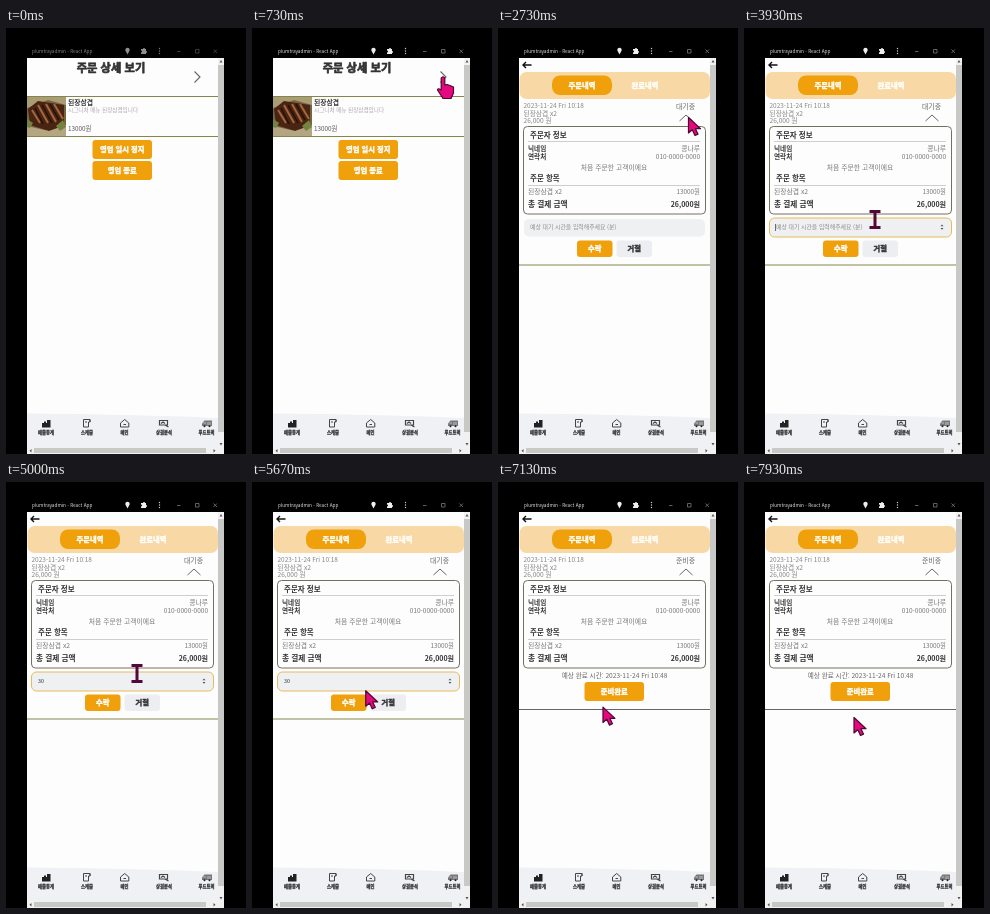
These frames come from a looping animation (240 px wide and 426 px high, 8 s). An HTML page:

```html
<!DOCTYPE html>
<html lang="ko">
<head>
<meta charset="utf-8">
<style>
html, body { margin: 0; width: 100%; height: 100%; overflow: hidden; background: #000; }
svg { display: block; width: 240px; height: 426px; font-family: "Noto Sans CJK KR", "Noto Sans CJK", "Noto Sans CJK JP", sans-serif; }
</style>
</head>
<body>
<svg id="stage" viewBox="0 0 240 426"></svg>
<script>
const LOOP = 8000;
const ORANGE = '#f0a00a', OLIVE = '#85854a', INK = '#333', GREY = '#777';

// Drawing helpers returning SVG markup
const text = (x, y, size, str, fill = GREY, weight = 400, anchor = 'start', outline = 0) =>
  `<text x="${x}" y="${y}" font-size="${size}" fill="${fill}" stroke="${fill}" stroke-width="${outline}" stroke-linejoin="round" font-weight="${weight}" text-anchor="${anchor}">${str}</text>`;
const bold = (x, y, size, str, anchor, fill = INK) => text(x, y, size, str, fill, 700, anchor);
const heavy = (x, y, size, str, fill = INK) => text(x, y, size, str, fill, 900, 'middle', size * .06);
const rect = (x, y, w, h, fill, r = 0, stroke = 'none') =>
  `<rect x="${x}" y="${y}" width="${w}" height="${h}" rx="${r}" fill="${fill}" stroke="${stroke}"/>`;
const line = (d, stroke, width = 1) =>
  `<path d="${d}" fill="none" stroke="${stroke}" stroke-width="${width}"/>`;
const shape = (d, fill) => `<path d="${d}" fill="${fill}"/>`;
const rule = (y, color = OLIVE) => line(`M21 ${y}H212`, color);
const button = (x, y, w, h, label, fill = ORANGE, ink = '#fff') =>
  rect(x, y, w, h, fill, 3) + heavy(x + w / 2, y + h / 2 + 2.3, 7.3, label, ink);
const group = (id, body) => `<g id="${id}">${body}</g>`;

const titleBar = group('title',
  text(26, 25, 4.7, 'plumtrayadmin - React App', '#ddd') +
  shape('M121.500 26.500L119.500 22.800A2.200 2.200 0 1 1 123.500 22.800Z', '#eee') +
  shape('M135 21H137A1 1 0 0 1 139 21H140V23A1 1 0 0 1 140 25V26H135V24.500A1 1 0 0 0 135 22.500Z', '#eee') +
  [20.5, 23, 25.5].map(y => `<circle cx="153.500" cy="${y}" r=".7" fill="#ccc"/>`).join('') +
  line('M171 23.500H174.500M189.500 21.500H193V25H189.500ZM207.500 21.500L211 25M211 21.500L207.500 25', '#888', .7));

const scrollbars =
  rect(212, 30, 6, 396, '#f1f1f1') + rect(212, 37, 6, 367, '#c8c8c6') +
  rect(21, 420, 191, 6, '#f1f1f1') + rect(28, 420, 172, 5, '#c8c8c6') +
  shape('M213.500 34.500L215 32L216.500 34.500Z M213.500 415L215 417.500L216.500 415Z', '#555') +
  shape('M25.500 421L23.500 422.700L25.500 424.500Z M207.500 421L209.500 422.700L207.500 424.500Z', '#555');

const navItems = [[40, '매출통계'], [81, '스케줄'], [118.5, '메인'], [158, '상권분석'], [200.5, '푸드트럭']];
const nav =
  shape('M21 385.500Q120 386 212 390V420H21Z', '#eff1f5') +
  navItems.map(([x, label]) => heavy(x, 406, 4.3, label)).join('') +
  shape('M36 399.500V395H38V393.500H40V395H41V392H44.500V399.500Z', '#222') +
  line('M77.500 391.500H84V394H82.500V399H77.500ZM84 394V391.500M79 394H81', '#444') +
  line('M114.500 395L118.700 391.500L122.800 395V399H114.500ZM117.500 396.500H120', '#444') +
  line('M153.500 392.500H161.500V397H153.500ZM155 395.500L157 394L159 395.500M159 397L162.500 399', '#444', 1.2) +
  shape('M196 398V395.500L198.500 392.500H206V398Z', '#777') +
  line('M197.500 395H200M202 394V397M204 394V397', '#ddd', .7) +
  '<circle cx="198.500" cy="398.300" r="1" fill="#222"/><circle cx="203.500" cy="398.300" r="1" fill="#222"/>';

const photo =
  rect(21, 69, 39, 39, '#77653f') +
  shape('M21 69H60V77L42 72L21 80Z', '#a99d76') +
  shape('M22 81L32 73L58 77V98L43 103L24 97Z', '#4a2412') +
  line('M26 82L34 95M32 77L42 95M40 76L50 94M48 76L57 91', '#a3683f', 2) +
  line('M29 80L37 96M36 77L46 95M44 76L53 92', '#24100a', 1.5) +
  shape('M21 98L43 103L60 97V108H21Z', '#b5a683') +
  shape('M21 91L27 95L24 100L21 99ZM50 98L57 92L60 99L54 103Z', '#748440');

const menuPage =
  heavy(105, 44.3, 11.3, '주문 상세 보기') +
  line('M188.500 43.500L194 49L188.500 54.500', '#666', 1.1) +
  rule(68.5) + photo + rule(108.5) +
  bold(62, 77, 6.8, '된장삼겹') +
  text(62, 83.5, 5.6, '시그니처 메뉴 된장삼겹입니다', '#aaa4b2') +
  text(62, 103, 6.3, '13000원', '#555') +
  button(86.5, 112, 59.5, 19, '영업 일시 정지') + button(86.5, 133, 59.5, 19, '영업 종료');

const orderHeader =
  line('M33.500 37H25M28 34L25 37L28 40', '#111', 1.4) +
  rect(21.5, 44, 190.5, 27, '#f8d9a5', 7) +
  rect(54, 47.5, 60, 19.5, ORANGE, 8) +
  heavy(84, 59.7, 7.3, '주문내역', '#fff') + heavy(147, 59.7, 7.3, '완료내역', '#fff') +
  text(25.5, 80, 6.45, '2023-11-24 Fri 10:18', '#858585') +
  text(25.5, 87.5, 6.7, '된장삼겹 x2', '#858585') + text(25.5, 95, 6.6, '26,000 원', '#858585') +
  `<text id="status" x="187.500" y="81" font-size="6.900" fill="#666" text-anchor="middle"></text>`;

const details =
  line('M181.500 93L188 87L194.500 93', '#666') +
  rect(25.5, 98.5, 182, 87.5, '#fdfdfd', 4, '#747060') +
  bold(32, 109.5, 7.5, '주문자 정보') + line('M30 113.500H202M30 157.500H202', '#bbb', .7) +
  bold(30, 122.5, 6.6, '닉네임') + text(202, 122.5, 6.8, '콩나루', GREY, 400, 'end') +
  bold(30, 131, 6.6, '연락처') + text(202, 131, 6.5, '010-0000-0000', GREY, 400, 'end') +
  text(116, 141.5, 6.8, '처음 주문한 고객이에요', GREY, 400, 'middle') +
  bold(32, 153, 7.5, '주문 항목') +
  text(30, 166, 6.8, '된장삼겹 x2') + text(202, 166, 6.4, '13000원', GREY, 400, 'end') +
  bold(30, 178.5, 7.7, '총 결제 금액') + bold(202, 178.5, 7, '26,000원', 'end');

const waiting =
  rect(26, 191, 181, 17.5, '#eff0f1', 5) +
  group('focus', rect(25.5, 190, 182, 19, '#eff0f1', 5, '#e8b95a') +
    shape('M196.500 198.300L198 196.500L199.500 198.300Z M196.500 200L198 201.800L199.500 200Z', '#555')) +
  group('caret', line('M31.500 196V203', '#333', .7)) +
  group('placeholder', text(32, 201.3, 5.9, '예상 대기 시간을 입력해주세요 (분)', '#8c8c8c')) +
  '<text id="minutes" x="32" y="201" font-size="5.300" fill="#333"></text>' +
  button(79, 212.5, 35.5, 16.5, '수락') + button(118.5, 212.5, 35.5, 16.5, '거절', '#eceef1', INK) +
  rule(237);

const accepted =
  text(116.5, 195.5, 6.6, '예상 완료 시간: 2023-11-24 Fri 10:48', '#666', 400, 'middle') +
  button(86.5, 200, 59.5, 19, '준비완료') + rule(227.5, '#666');

const cursorShape = d => `<path d="${d}" fill="#e5087f" stroke="#4a0830" stroke-width="1.200" stroke-linejoin="round"/>`;
const pointers =
  group('arrow', cursorShape('M0 0V15.500L3.800 12.200L6.500 18L9.500 16.600L6.900 11.200H12Z')) +
  group('beam', line('M-5.500 -8H5.500M0 -8V8M-5.500 8H5.500', '#54083a', 3)) +
  group('hand', cursorShape('M-1.800 1Q0 -1.500 1.800 1V8L4 7.500L7 8.500L10.500 10V16L8 21.500H0L-5.500 13Q-5.500 10.500 -1.800 13Z'));

document.getElementById('stage').innerHTML =
  rect(0, 0, 240, 426, '#000') + titleBar + rect(21, 30, 191, 396, '#fdfdfd') +
  group('menu', menuPage) +
  group('orders', orderHeader +
    group('closed', line('M181.500 87.500L188 93.500L194.500 87.500', '#666') + rule(102.5)) +
    group('opened', details + group('waiting', waiting) + group('accepted', accepted))) +
  nav + scrollbars + group('cursor', pointers);

const el = id => document.getElementById(id);
const show = (id, on) => el(id).setAttribute('display', on ? 'inline' : 'none');

// Pointer stops: time, x, y
const stops = [
  [200, 212, 62], [600, 191, 49], [950, 191, 49], [1400, 168, 48], [1900, 190, 89.5],
  [2800, 190.5, 89.5], [3450, 131, 191.5], [5300, 131, 191.5], [5950, 102.5, 220],
  [6900, 102.5, 220], [7500, 110, 235.5], [LOOP, 110, 235.5]
];
const pointerAt = time => {
  const next = Math.max(1, stops.findIndex(stop => stop[0] > time));
  const [t0, x0, y0] = stops[next - 1], [t1, x1, y1] = stops[next];
  const p = Math.min(1, Math.max(0, (time - t0) / (t1 - t0)));
  const ease = p * p * (3 - 2 * p);
  return [x0 + (x1 - x0) * ease, y0 + (y1 - y0) * ease];
};

function draw(time) {
  const onOrders = time >= 870, open = time >= 2130, done = time >= 6730;
  const focused = time >= 3600 && time < 6130;
  const minutes = time < 4330 || time >= 6130 ? '' : time < 4600 ? '3' : '30';
  const [x, y] = pointerAt(time);
  const inside = (left, top, right, bottom) => x >= left && x <= right && y >= top && y <= bottom;
  const overInput = open && !done && inside(26, 191, 207, 208);
  const overButton = !onOrders ? inside(186, 42, 196, 56)
    : open && !done && (inside(79, 213, 114, 229) || inside(118, 213, 154, 229));

  show('menu', !onOrders);
  show('orders', onOrders);
  show('closed', !open);
  show('opened', open);
  show('waiting', !done);
  show('accepted', done);
  show('focus', focused);
  show('caret', focused && !minutes && (time - 3600) % 1000 < 500);
  show('placeholder', !minutes);
  el('minutes').textContent = minutes;
  el('status').textContent = done ? '준비중' : '대기중';
  el('title').setAttribute('opacity', time < 200 ? .6 : 1);

  show('cursor', time >= 200);
  show('beam', overInput);
  show('hand', overButton);
  show('arrow', !overInput && !overButton);
  el('cursor').setAttribute('transform', `translate(${x} ${y})`);
}

const start = performance.now();
function tick() {
  draw((performance.now() - start) % LOOP);
  requestAnimationFrame(tick);
}
tick();
</script>
</body>
</html>
```
